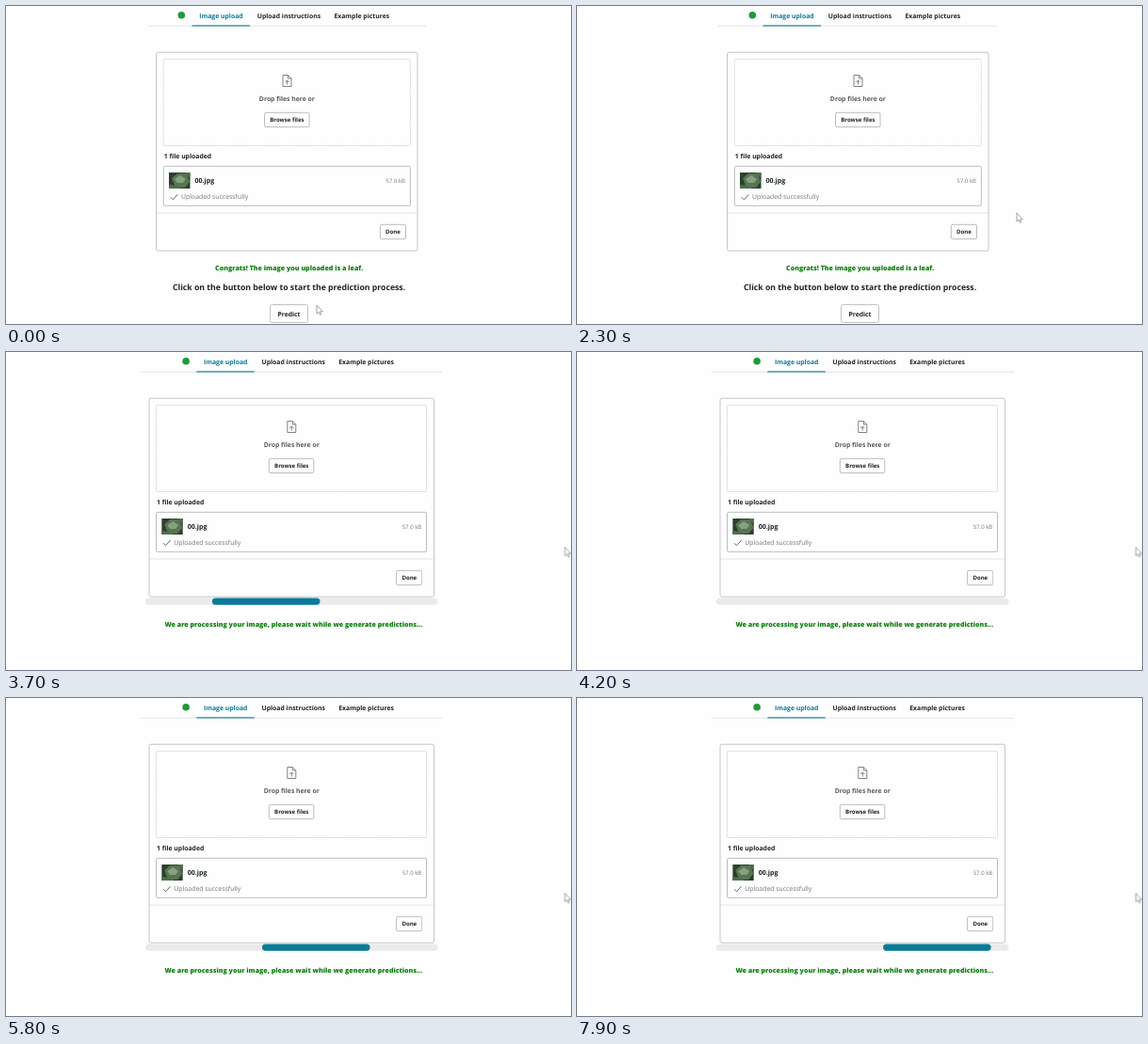
An HTML page for the animation above (8000 ms loop, 600 by 338 pixels).

```html
<!DOCTYPE html>
<html lang="en">
<head>
<meta charset="utf-8">
<title>Image upload</title>
<style>
html, body { margin: 0; width: 100%; height: 100%; overflow: hidden; background: #fefefe; }
svg { display: block; width: 600px; height: 338px; }
text { font: 700 6.85px "Open Sans", "Noto Sans", sans-serif; fill: #1c2326; text-rendering: geometricPrecision; }
.mid { text-anchor: middle; }
.small { font-size: 6.05px; }
.soft { font-weight: 400; fill: #767676; }
.grey { fill: #555b5f; }
.note { font-size: 7.07px; font-weight: 800; fill: #0d800d; }
.lead { font-size: 8.7px; }
.teal { fill: #0b7a98; }
.box { fill: none; stroke: #b9bcbe; }
.card { stroke: #c4c6c7; }
.zone { fill: none; stroke: #c6c6c6; stroke-dasharray: 1 1; }
.rule { fill: none; stroke: #e4e4e4; }

/* One 8 s loop; the layout switches at 2.4 s (30%). */
.before, .after, .shift, .hover, .label, .cursor, .nudge { animation: 8s -5ms step-end infinite; }
.before { animation-name: hide; }
.after { animation-name: show; }
.shift { animation-name: shift; }
.hover { animation-name: hover; }
.label { animation-name: label; }
.cursor { animation-name: cursor; }
.nudge { animation-name: nudge; }
.bar { animation: slide 1s -705ms steps(10, end) infinite; }

@keyframes hide { 0% { visibility: visible; } 30%, 100% { visibility: hidden; } }
@keyframes show { 0% { visibility: hidden; } 30%, 100% { visibility: visible; } }
@keyframes shift { 0% { transform: none; } 30%, 100% { transform: translateX(var(--dx)); } }
@keyframes slide { from { transform: translateX(6.5px); } to { transform: translateX(537.5px); } }
@keyframes nudge { 0% { transform: translateX(11px); } 41.25%, 100% { transform: none; } }
@keyframes hover {
  0% { fill: #fefefe; stroke: #c0c3c5; }
  5% { fill: #c3e2e8; stroke: #4a93a3; }
  23.75%, 100% { fill: #fefefe; stroke: #c0c3c5; }
}
@keyframes label {
  0% { fill: #1c2326; }
  5% { fill: #0c4a5a; }
  23.75%, 100% { fill: #1c2326; }
}
@keyframes cursor {
  0% { transform: translate(330px, 318px); }
  1.25% { transform: translate(329px, 319px); }
  2.5% { transform: translate(326px, 321px); }
  3.75% { transform: translate(321px, 324px); }
  5% { transform: translate(315px, 327px); }
  6.25% { transform: translate(310px, 329px); }
  7.5% { transform: translate(308.5px, 330px); }
  22.5% { transform: translate(314px, 328px); }
  23.75% { transform: translate(328px, 320px); }
  25% { transform: translate(352px, 304px); }
  26.25% { transform: translate(385px, 280px); }
  27.5% { transform: translate(425px, 250px); }
  28.75% { transform: translate(467px, 220px); }
  30% { transform: translate(504px, 198px); }
  31.25% { transform: translate(548px, 189px); }
  32.5% { transform: translate(580px, 199px); }
  33.75%, 100% { transform: translate(593.5px, 207.5px); }
}
</style>
</head>
<body>
<svg viewBox="0 0 600 338">
  <defs>
    <clipPath id="track"><rect x="148" y="261.5" width="310.5" height="7.2" rx="3.6"/></clipPath>
    <clipPath id="thumb"><rect x="173" y="177" width="22.5" height="17"/></clipPath>
  </defs>

  <g class="before">
    <path class="rule" d="M150 21.3H446M160 220H437"/>
    <rect class="box card" x="159.5" y="49.2" width="277.5" height="211" rx="2"/>
    <rect class="zone" x="167.3" y="56.5" width="262" height="92" rx="1"/>
    <rect class="box" x="167.3" y="170.3" width="262" height="42" rx="1.5"/>
    <text class="mid note" x="300.7" y="281.4">Congrats! The image you uploaded is a leaf.</text>
    <text class="mid lead" x="300.6" y="301.7">Click on the button below to start the prediction process.</text>
    <rect class="hover" x="280.5" y="317.5" width="40" height="19" rx="2"/>
    <text class="mid label" x="300.5" y="329.7">Predict</text>
  </g>

  <g class="after">
    <path class="rule" d="M143 21.3H464M152 220H454"/>
    <rect class="box card" x="152" y="49.2" width="302.5" height="211" rx="2"/>
    <rect class="zone" x="159.5" y="56.5" width="287" height="92" rx="1"/>
    <rect class="box" x="159.5" y="170.3" width="287" height="42" rx="1.5"/>
    <g clip-path="url(#track)">
      <rect x="148" y="261" width="311" height="8" fill="#ebebeb"/>
      <g class="nudge"><rect class="bar teal" y="261.5" width="114.5" height="7.2" rx="3.6"/></g>
    </g>
    <text class="mid note" x="305.3" y="292.4">We are processing your image, please wait while we generate predictions...</text>
  </g>

  <g class="shift" style="--dx: 4.8px">
    <circle cx="186.3" cy="9.8" r="3.8" fill="#1f9a3c"/>
    <text class="mid teal" x="228.4" y="13">Image upload</text>
    <text class="mid" x="300.4" y="13">Upload instructions</text>
    <text class="mid" x="377.8" y="13">Example pictures</text>
    <rect class="teal" x="197.5" y="20.4" width="61.5" height="1.1"/>
    <path d="M294 73.5h5.5l3.5 3.5v8.5h-9zM299.5 73.5v3.5h3.5M298.5 83.5v-4.5M296.4 81l2.1-2.1 2.1 2.1" fill="none" stroke="#7d8589"/>
    <text class="mid grey" x="298.4" y="100.5">Drop files here or</text>
    <rect class="box" x="274.5" y="113.3" width="47.5" height="15.3" rx="1.5"/>
    <text class="mid small" x="298.4" y="123.3">Browse files</text>
  </g>

  <g class="shift" style="--dx: -7.8px">
    <text x="167.8" y="162.3">1 file uploaded</text>
    <g clip-path="url(#thumb)">
      <rect x="173" y="177" width="23" height="17" fill="#2c402b"/>
      <path d="M176 183l6-5h10l3 9-5 6h-10z" fill="#577553"/>
      <path d="M179 184l6-4 6 4-3 4h-6z" fill="#86a080"/>
      <path d="M173 190l8 1 5 3h-13zM190 177h6v7z" fill="#4d7048"/>
    </g>
    <text x="200.5" y="188" style="font-size: 7.1px">00.jpg</text>
    <path d="M174.8 203.2l2.5 2.6 5-5.6" fill="none" stroke="#56705f"/>
    <text class="soft" x="186" y="204.6" style="font-size: 6.9px">Uploaded successfully</text>
  </g>

  <g class="shift" style="--dx: 17.3px">
    <text class="soft small" x="424" y="187.6" text-anchor="end">57.0 kB</text>
    <rect class="box" x="397.3" y="232.3" width="27.2" height="15.4" rx="1.5"/>
    <text class="mid small" x="411" y="242.3">Done</text>
  </g>

  <path class="cursor" d="M0 0V9.2L2.1 7.3L3.5 10.3L4.8 9.7L3.5 6.8H6.3Z" fill="#fff" stroke="#8a8a8a" stroke-width=".8"/>
</svg>
</body>
</html>
```
